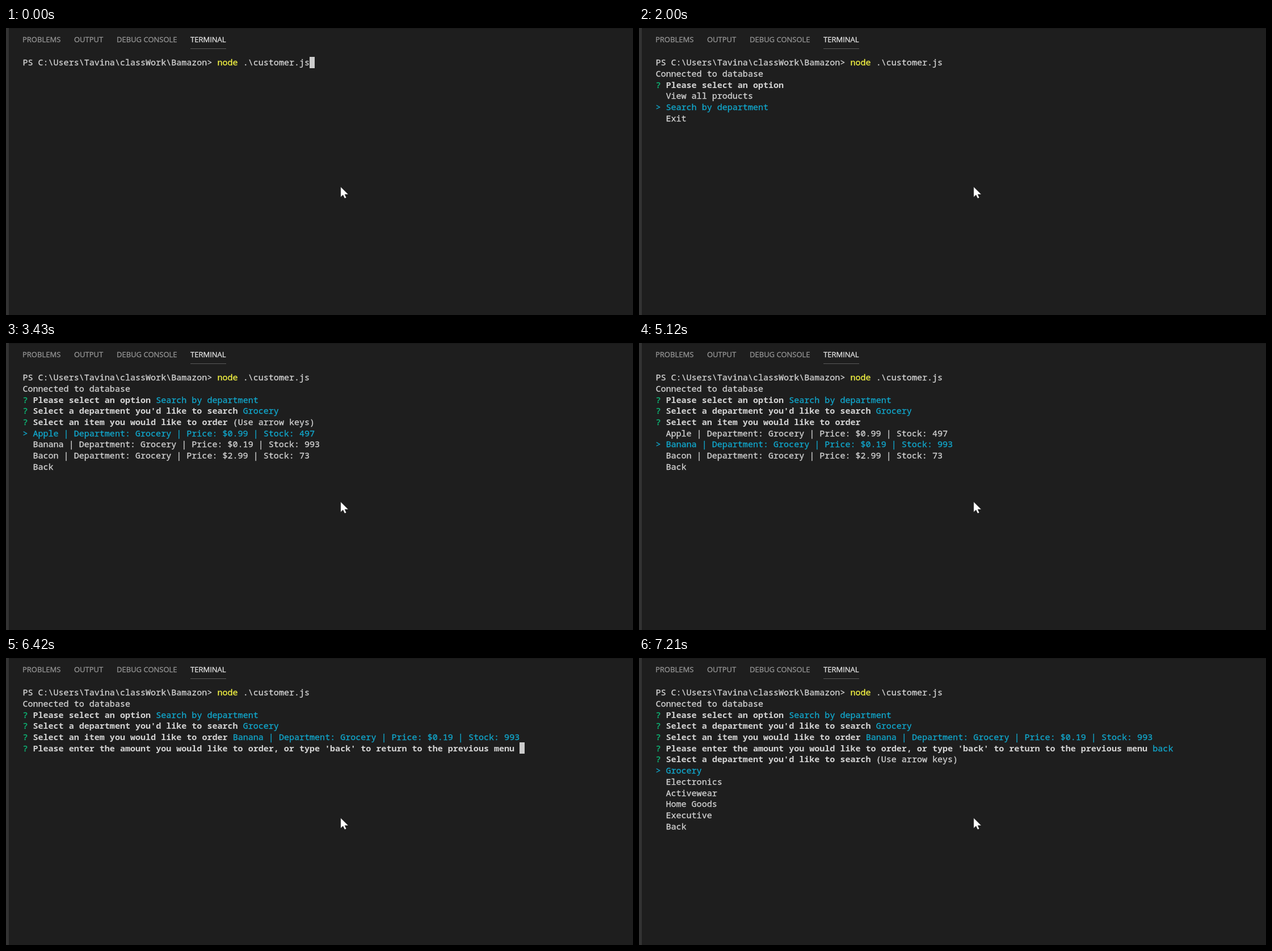
Animation, 1105 px wide and 507 px high, one loop 8000 ms. Source, as an HTML page:

```html
<!DOCTYPE html>
<html lang="en">
<head>
<meta charset="utf-8">
<title>Terminal session</title>
<style>
  html, body { margin: 0; width: 100%; height: 100%; overflow: hidden; background: #1e1e1e; }
  svg { display: block; width: 1105px; height: 507px; }
  text { white-space: pre; stroke-width: .3px; }
  #tabs { font: 13px "Open Sans", "Noto Sans", sans-serif; fill: #969696; stroke: #969696; }
  #tabs .active { fill: #e7e7e7; stroke: #e7e7e7; }
  #screen { font: 15.05px "Noto Sans Mono", "DejaVu Sans Mono", monospace; fill: #d4d4d4; stroke: #d4d4d4; }
  #screen .bold { font-weight: 700; stroke: none; }
  #screen .cyan { fill: #11a8cd; stroke: #11a8cd; }
  #screen .green { fill: #0dbc79; stroke: #0dbc79; }
  #screen .yellow { fill: #f5f543; stroke: #f5f543; }
</style>
</head>
<body>
<svg viewBox="0 0 1105 507">
  <rect width="1105" height="507" fill="#1e1e1e"/>
  <rect x="5" width="1100" height="1" fill="#191919"/>
  <rect width="5" height="507" fill="#333"/>
  <g id="tabs">
    <text x="29" y="25">PROBLEMS</text>
    <text x="120" y="25">OUTPUT</text>
    <text x="195" y="25">DEBUG CONSOLE</text>
    <text x="325" y="25" class="active">TERMINAL</text>
  </g>
  <rect x="325" y="36" width="63" height="1" fill="#5a5a5a"/>
  <g id="screen"></g>
  <rect id="caret" width="9" height="20" fill="#ccc"/>
  <path id="pointer" d="M0 0V18.2L4.1 14.4L7 20.6L10 19.3L7.3 13.4H13.5Z" fill="#fff" stroke="#111" stroke-width=".5"/>
</svg>
<script>
const LOOP = 8000, LEFT = 29.4, TOP = 51, CHAR = 9.03, ROW = 19.68;
const screen = document.getElementById('screen');
const caret = document.getElementById('caret');
const pointer = document.getElementById('pointer');

// A line is a list of [text, style] spans.
const plain = text => [[text, '']];
const question = (text, answer = '', style = 'cyan') =>
  [['? ', 'green'], [text + ' ', 'bold'], [answer, style]];
const ask = text => question(text, '(Use arrow keys)', '');
const menu = (options, selected) => options.map((option, i) =>
  i === selected ? [['> ' + option, 'cyan']] : plain('  ' + option));

const item = (name, price, stock) =>
  `${name} | Department: Grocery | Price: $${price} | Stock: ${stock}`;
const items = [item('Apple', '0.99', 497), item('Banana', '0.19', 993), item('Bacon', '2.99', 73), 'Back'];
const departments = ['Grocery', 'Electronics', 'Activewear', 'Home Goods', 'Executive', 'Back'];
const actions = ['View all products', 'Search by department', 'Exit'];

const chooseAction = 'Please select an option';
const chooseDepartment = "Select a department you'd like to search";
const chooseItem = 'Select an item you would like to order';
const enterAmount = "Please enter the amount you would like to order, or type 'back' to return to the previous menu";

const command = [['PS C:\\Users\\Tavina\\classWork\\Bamazon> ', ''], ['node', 'yellow'], [' .\\customer.js', '']];
const connected = [command, plain('Connected to database')];
const actionDone = [...connected, question(chooseAction, actions[1])];
const departmentDone = [...actionDone, question(chooseDepartment, departments[0])];
const itemDone = [...departmentDone, question(chooseItem, items[1])];
const typed = text => [...itemDone, question(enterAmount, text, '')];

// Each step: start time, lines, whether the caret follows the last line.
const steps = [
  [0, [command], true],
  [470, [command, plain('')], true],
  [1100, connected],
  [1170, [...connected, ask(chooseAction), ...menu(actions, 0)]],
  [2000, [...connected, question(chooseAction), ...menu(actions, 1)]],
  [2130, [...actionDone, ask(chooseDepartment), ...menu(departments, 0)]],
  [3430, [...departmentDone, ask(chooseItem), ...menu(items, 0)]],
  [5120, [...departmentDone, question(chooseItem), ...menu(items, 1)]],
  [5370, typed(''), true],
  [6480, typed('b'), true],
  [6630, typed('ba'), true],
  [6740, typed('bac'), true],
  [6940, typed('back'), true],
  [7210, [...itemDone, question(enterAmount, 'back'), ask(chooseDepartment), ...menu(departments, 0)]]
];

function svgNode(parent, tag, attributes) {
  const node = document.createElementNS('http://www.w3.org/2000/svg', tag);
  for (const name in attributes) node.setAttribute(name, attributes[name]);
  return parent.appendChild(node);
}

function drawLine(spans, row) {
  const line = svgNode(screen, 'text', { y: Math.round(TOP + 15.4 + row * ROW) });
  let column = 0;
  for (const [text, style] of spans) {
    svgNode(line, 'tspan', { x: LEFT + column * CHAR, class: style }).textContent = text;
    column += text.length;
  }
  return column;
}

let shown;
function render(time) {
  pointer.setAttribute('transform', `translate(589.8 ${time < 6420 ? 280.5 : 282.5})`);
  const step = steps.findLast(([start]) => start <= time);
  if (step === shown) return;
  shown = step;
  const [, lines, hasCaret] = step;
  screen.replaceChildren();
  const lengths = lines.map(drawLine);
  const row = lines.length - 1;
  caret.setAttribute('x', Math.round(LEFT + lengths[row] * CHAR));
  caret.setAttribute('y', Math.floor(TOP + row * ROW));
  caret.setAttribute('visibility', hasCaret ? 'visible' : 'hidden');
}

const begin = performance.now();
function tick() {
  render((performance.now() - begin) % LOOP);
  requestAnimationFrame(tick);
}
tick();
</script>
</body>
</html>
```
